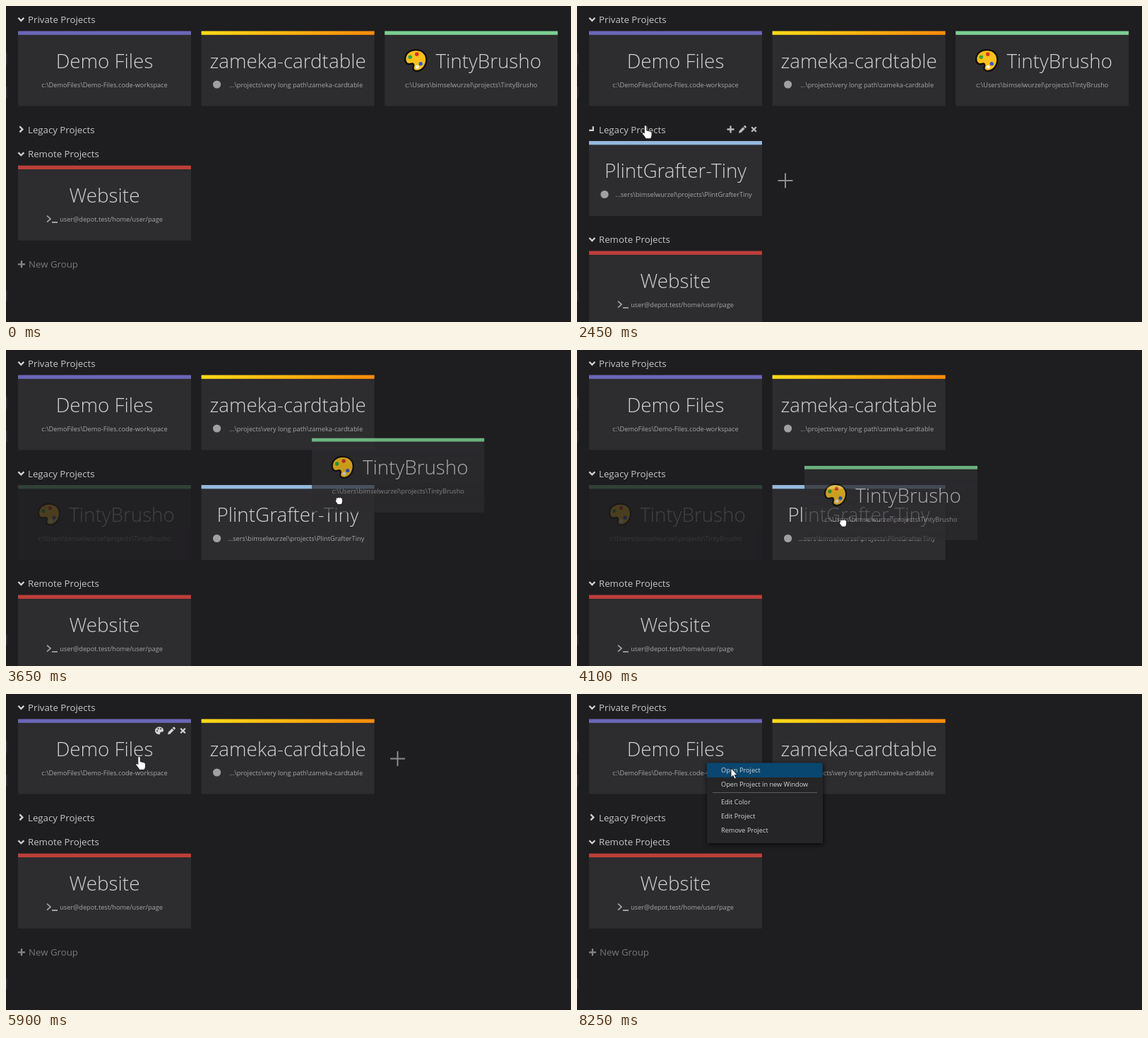
An HTML page for the animation above (8.3 s loop, 800 by 447 pixels).

```html
<!DOCTYPE html>
<html lang="en">
<head>
<meta charset="utf-8">
<title>Project dashboard</title>
<style>
  html, body { margin: 0; width: 100%; height: 100%; overflow: hidden; background: #1e1d20; }
  svg { display: block; width: 800px; height: 447px; font-family: "Open Sans", "Noto Sans", sans-serif; }
  .head { font-size: 13.25px; fill: #c6c6c7; }
  .title { font-size: 27.8px; font-weight: 300; fill: #d2d2d3; text-anchor: middle; }
  .path { font-size: 9.2px; fill: #a6a6a8; text-anchor: middle; }
  .item { font-size: 9.2px; fill: #d6d6d6; }
  .line { fill: none; stroke: #d2d2d2; stroke-width: 2.3; }
</style>
</head>
<body>
<svg id="stage" viewBox="0 0 800 447">
  <defs>
    <linearGradient id="sun"><stop stop-color="#fbdc18"/><stop offset="1" stop-color="#f98a0c"/></linearGradient>
    <linearGradient id="fade" x2="0" y2="1">
      <stop stop-color="#fff" stop-opacity=".84"/><stop offset="1" stop-color="#fff" stop-opacity=".68"/>
    </linearGradient>
    <mask id="lift" maskUnits="userSpaceOnUse" x="0" y="0" width="245" height="106">
      <rect width="245" height="106" fill="url(#fade)"/>
    </mask>
    <filter id="soft" x="-10%" y="-10%" width="120%" height="125%"><feGaussianBlur stdDeviation="3"/></filter>
  </defs>
  <rect width="800" height="447" fill="#1e1d20"/>
  <path d="M0 66h1.5v17h-1.5zM0 114h1.5v16h-1.5zM0 402h1.5v15h-1.5z" fill="#343438"/>
</svg>
<script>
const LOOP = 8300;
const stage = document.getElementById('stage');

function add(parent, tag, attrs = {}, text) {
  const el = document.createElementNS('http://www.w3.org/2000/svg', tag);
  for (const k in attrs) el.setAttribute(k, attrs[k]);
  if (text) el.textContent = text;
  parent.appendChild(el);
  return el;
}
const group = (parent = stage) => add(parent, 'g');
const path = (parent, d, attrs) => add(parent, 'path', { d, ...attrs });
const dot = (parent, cx, cy, r, fill) => add(parent, 'circle', { cx, cy, r, fill });
const label = (parent, cls, x, y, text) => add(parent, 'text', { class: cls, x, y }, text);
const place = (el, x, y, rest = '') => el.setAttribute('transform', `translate(${x} ${y})${rest}`);
const show = (el, alpha) => {
  el.setAttribute('opacity', alpha);
  el.setAttribute('visibility', alpha > 0 ? 'visible' : 'hidden');
};

function paintBoard(parent, x, y) {
  const g = group(parent);
  place(g, x, y);
  path(g, 'M2-15C-8-16-15-10-15-2C-15 4-11 6-7 4.5C-3 3-2 6-3.5 9C-5 13-1 15.5 4 14.5C11 13 15.5 5 15-3C14-10 9-14.5 2-15Z',
    { fill: '#fac01c', stroke: '#0c0a08', 'stroke-width': 2.2 });
  dot(g, 1.5, -9, 2.7, '#d93224');
  dot(g, -8, -5, 2.7, '#2fa63c');
  dot(g, 7, 4.5, 2.6, '#2c58c8');
  dot(g, 2, 9, 2.5, '#f4f1e8');
}

// A card is drawn around its top left corner.
function card(color, title, where, mark) {
  const g = group();
  add(g, 'rect', { width: 245, height: 106, fill: '#2d2c2f' });
  add(g, 'rect', { width: 245, height: 5.3, fill: color });
  const art = mark === 'art';
  label(g, 'title', art ? 147 : 122.5, 52.2, title);
  if (art) paintBoard(g, 44, 41.7);
  const shift = { badge: 134, prompt: 132 }[mark] || 122.5;
  label(g, 'path', shift, 79.2, where);
  if (mark === 'badge') dot(g, 22, 75.5, 5.6, '#a0a0a0');
  if (mark === 'prompt')
    path(g, 'M41 71l5 4.5-5 4.5M48 80.3h8', { class: 'line', style: 'stroke:#a0a0a0;stroke-width:1.8' });
  return g;
}

function header(text) {
  const g = group();
  const arrow = path(g, 'M-4-2L0 2L4-2', { class: 'line' });
  label(g, 'head', 31, 4.8, text);
  return { g, arrow };
}

// Hover tools, centred on y = 0.
function tools(first) {
  const g = group();
  if (first === 'plus') path(g, 'M212.5 0h10M217.5-5v10', { class: 'line' });
  else {
    path(g, 'M217-5.5C221-5.5 223-3 223-.5C223 2 220 1.6 218.8 2C217.5 2.7 219.3 5 217 5.3C213.5 5 211 3 211-.2C211-3 214-5.5 217-5.5Z',
      { fill: '#d2d2d2' });
    [[214, 0], [215.6, -2.7], [219, -2.7]].forEach(p => dot(g, ...p, 1, '#2d2c2f'));
  }
  path(g, 'M229 5.3l.8-3.4 5.2-5.2 2.6 2.6-5.2 5.2zM235.7-4l1.2-1.2q.8-.6 1.5 0l1.2 1.2q.6.8 0 1.4l-1.2 1.2z', { fill: '#d2d2d2' });
  path(g, 'M247.2-3.3l6.6 6.6M253.8-3.3l-6.6 6.6', { class: 'line' });
  return g;
}

const privateHead = header('Private Projects');
const legacyHead = header('Legacy Projects');
const remoteHead = header('Remote Projects');
const user = 'bimselwurzel';
const demo = card('#6c66b9', 'Demo Files', 'c:\\DemoFiles\\Demo-Files.code-workspace');
const board = card('url(#sun)', 'zameka-cardtable', '...\\projects\\very long path\\zameka-cardtable', 'badge');
const starter = card('#94b8dc', 'PlintGrafter-Tiny', `...sers\\${user}\\projects\\PlintGrafterTiny`, 'badge');
const site = card('#bd3f38', 'Website', 'user@depot.test/home/user/page', 'prompt');
const makeArt = () => card('#7acf91', 'TintyBrusho', `c:\\Users\\${user}\\projects\\TintyBrusho`, 'art');
const art = makeArt();

const newGroup = group();
path(newGroup, 'M17 365.3h10M22 360.3v10', { class: 'line', style: 'stroke:#848486' });
label(newGroup, 'head', 32, 370.2, 'New Group').style.fill = '#777779';

const plus = path(stage, 'M-10.5 0h21M0-10.5v21', { class: 'line', style: 'stroke:#8c8c8e;stroke-width:2' });
const headTools = tools('plus');
const cardTools = tools('paint');
const dragged = makeArt();
dragged.setAttribute('mask', 'url(#lift)');

const menu = group();
add(menu, 'rect', { x: 184, y: 99, width: 165, height: 114, fill: '#000', opacity: .7, filter: 'url(#soft)' });
add(menu, 'rect', { x: 184, y: 97, width: 164, height: 114, fill: '#252527' });
const picked = add(menu, 'rect', { x: 184, y: 97.5, width: 163.5, height: 20.5, fill: '#0a4770' });
path(menu, 'M192 139.5h148', { stroke: '#5c5c5e' });
[['Open Project', 107.5], ['Open Project in new Window', 127.7], ['Edit Color', 153],
 ['Edit Project', 173], ['Remove Project', 193]].forEach(([s, y]) => label(menu, 'item', 204, y + 3.3, s));

const ink = { fill: '#fff', stroke: '#161616', 'stroke-width': .9, 'stroke-linejoin': 'round' };
const cursors = {
  arrow: path(stage, 'M0 0V13l3-2.7 2.2 4.8 2.2-1-2.2-4.6h4z', ink),
  hand: path(stage, 'M-1.7 1.5a1.7 1.7 0 0 1 3.4 0V7l5.3 1.3q2 .5 2 2.5v3q0 2-1.6 5H.5q-2-3.6-4.9-6.8-1-2 .8-2.2 1 .1 1.9 1.3z', ink),
  fist: path(stage, 'M-4.5-3q1.2-2 2.4-.7 1-2 2.4-.3 1.5-1.6 2.4.2 2-.7 2 1.5v3.5q0 2-1.4 4.3h-5.4q-1.6-2.6-3-4.3-.5-2 .6-2z', ink)
};

const clamp = v => Math.max(0, Math.min(1, v));
const ramp = (t, from, span = 150) => clamp((t - from + 1) / span);
const during = (t, a, b) => t >= a && t < b;

// Eased travel between [time, x, y] stops.
function travel(t, stops, ease = true) {
  let i = 0;
  while (i < stops.length - 2 && t >= stops[i + 1][0]) i++;
  const [t0, x0, y0] = stops[i], [t1, x1, y1] = stops[i + 1];
  let k = clamp((t - t0) / (t1 - t0));
  if (ease) k *= k * (3 - 2 * k);
  return [x0 + (x1 - x0) * k, y0 + (y1 - y0) * k];
}

function pointer(t) {
  if (t < 1600) return null;
  if (t < 2500) return [t < 1750 ? 'arrow' : 'hand', travel(t, [[1560, -8, 244], [1850, 97, 169]])];
  if (t < 3280) return ['hand', travel(t, [[2500, 97, 169], [3230, 588, 109]])];
  if (t < 4250) return ['fist', travel(t, [[3280, 591, 117], [3650, 472, 213], [3960, 377, 244], [4200, 377, 245]], false)];
  if (t < 5200) return ['hand', travel(t, [[4300, 375, 238], [4680, 82, 174]])];
  if (t < 6600) return ['hand', travel(t, [[5200, 82, 174], [5650, 187, 89], [5860, 188.5, 88.5]])];
  return ['arrow', travel(t, [[6550, 188, 89], [7000, 218, 105]])];
}

const slot = i => 17 + i * 259.6;
const ROW = [35.5, 191];

function draw(t) {
  const open = during(t, 2450, 5050);
  const drag = during(t, 3300, 4250);
  const moved = t >= 3450;

  place(privateHead.g, 0, 19.2);
  place(legacyHead.g, 0, 174.8);
  place(remoteHead.g, 0, open ? 330.4 : 209.6);
  const turn = t < 2450 ? -90 : t < 5000 ? -45 + 45 * clamp((t - 2450) / 100)
    : t < 5050 ? 0 : -45 - 45 * clamp((t - 5050) / 100);
  for (const h of [privateHead, legacyHead, remoteHead])
    place(h.arrow, 21.4, -.4, ` rotate(${h === legacyHead ? turn : 0})`);

  place(demo, slot(0), ROW[0]);
  place(board, slot(1), ROW[0]);
  place(starter, slot(moved ? 1 : 0), ROW[1]);
  show(starter, open ? 1 : 0);
  place(art, slot(moved ? 0 : 2), ROW[moved ? 1 : 0]);
  show(art, drag ? .2 : !moved || open ? 1 : 0);
  place(site, slot(0), open ? 346.6 : 225.7);
  show(newGroup, open ? 0 : 1);

  place(dragged, ...travel(t, [[3300, 536, 36], [3650, 433, 124.2], [4000, 322, 162.8], [4200, 322, 164]], false));
  show(dragged, drag ? 1 : 0);

  place(headTools, 0, 174.5);
  show(headTools, .87 * (during(t, 2050, 2750) ? ramp(t, 2050) : during(t, 4800, 5300) ? ramp(t, 4800) : 0));
  place(cardTools, 0, 52);
  show(cardTools, during(t, 5650, 6650) ? ramp(t, 5650) : 0);

  const plusAt = during(t, 2450, 2750) ? [295, 247] : during(t, 4300, 5050) ? [554.5, 247]
    : during(t, 5450, 6650) ? [554.5, 91.5] : null;
  if (plusAt) place(plus, ...plusAt);
  show(plus, plusAt ? 1 : 0);

  show(menu, t >= 6250 ? 1 : 0);
  picked.setAttribute('fill-opacity', t >= 6750 ? 1 : 0);

  const now = pointer(t);
  for (const kind in cursors) {
    const on = now && now[0] === kind;
    show(cursors[kind], on ? 1 : 0);
    if (on) place(cursors[kind], ...now[1]);
  }
}

const start = performance.now();
function tick() {
  draw((performance.now() - start) % LOOP);
  requestAnimationFrame(tick);
}
draw(0);
requestAnimationFrame(tick);
</script>
</body>
</html>
```
